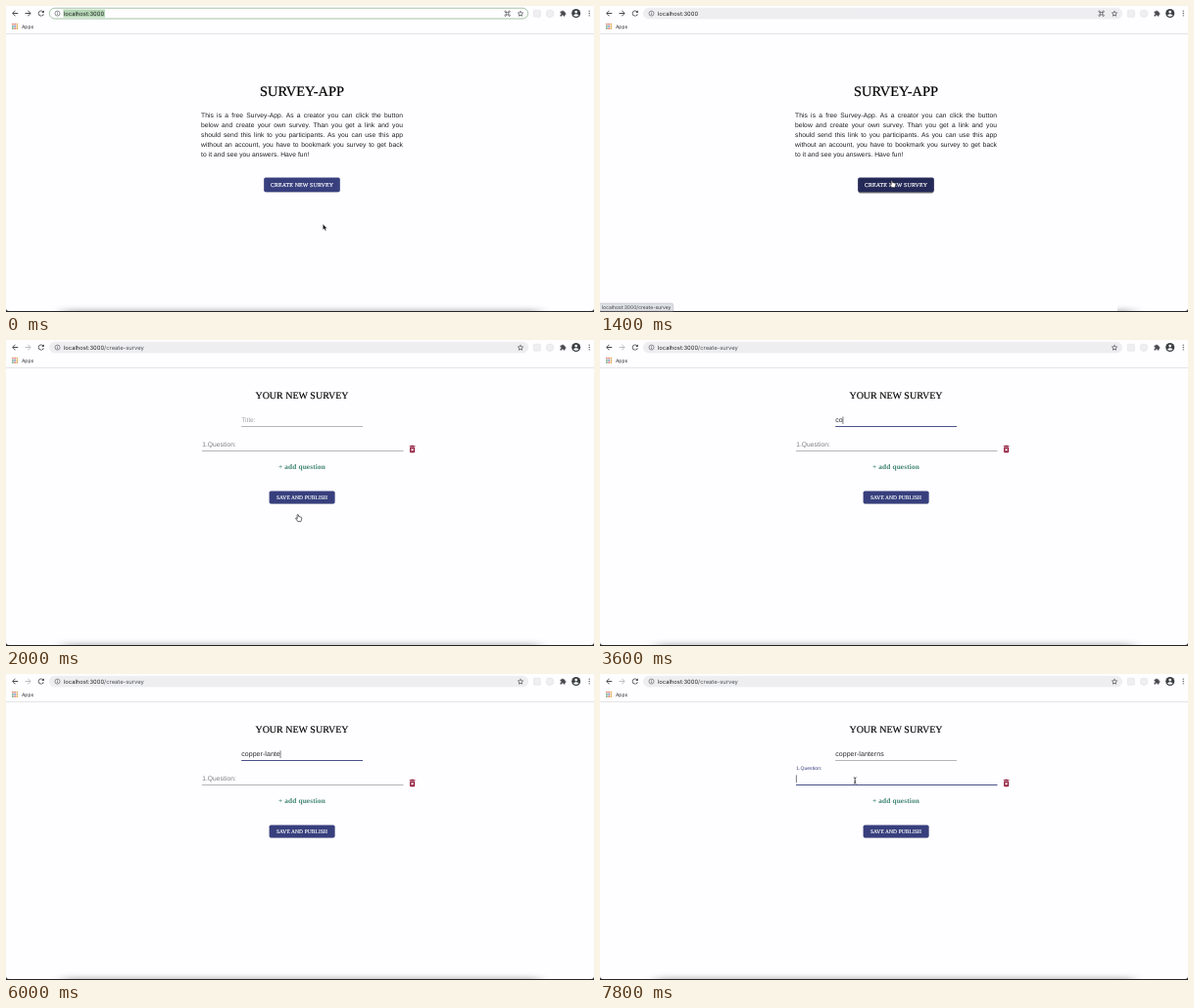
These frames come from a looping animation (600 px wide and 313 px high, 8000 ms). An HTML page:

```html
<!DOCTYPE html>
<html lang="en">
<head>
<meta charset="utf-8">
<title>Survey app</title>
<style>
  html, body { margin: 0; width: 100%; height: 100%; overflow: hidden; background: #fefdff; }
  svg { display: block; width: 100vw; height: 100vh; }
  text { text-rendering: geometricPrecision; white-space: pre; }
  .ui { font-family: Inter, "Open Sans", sans-serif; }
  .serif { font-family: "Liberation Serif", "Times New Roman", serif; }
  .sans, .intro { font-family: "Liberation Sans", Arial, sans-serif; letter-spacing: .06px; }
  .intro { font-size: 6.7px; line-height: 10px; color: #1c1c1e; text-rendering: geometricPrecision; }
  .intro div { text-align: justify; text-align-last: justify; }
  .intro div:last-child { text-align-last: left; }
  .mid { text-anchor: middle; }
</style>
</head>
<body>
<svg viewBox="0 0 600 313" xmlns="http://www.w3.org/2000/svg">
  <defs>
    <filter id="blur" x="-10%" y="-200%" width="120%" height="500%"><feGaussianBlur stdDeviation="7 2.6"/></filter>
    <filter id="soft" x="-10%" y="-30%" width="120%" height="170%"><feGaussianBlur stdDeviation=".7"/></filter>
    <clipPath id="glowClip"><rect id="glowArea" y="295" width="600" height="18"/></clipPath>
  </defs>
  <rect width="600" height="313" fill="#fefdff"/>

  <g id="toolbar">
    <rect id="pill" x="44.3" y="2.2" width="488.4" height="10.8" rx="5.4" stroke-width=".8"/>
    <rect id="selection" x="58.5" y="3.6" width="42.5" height="8" fill="#b4d6b4"/>
    <g id="icons" fill="#47494d"></g>
    <circle cx="52.5" cy="7.6" r="2.5" fill="none" stroke="#55585c" stroke-width=".65"/>
    <path d="M52.5 6.1v.7M52.5 7.3v1.8" stroke="#55585c" stroke-width=".65"/>
    <text class="ui" x="58.9" y="9.7" font-size="5.83" fill="#202124">localhost:3000<tspan id="path" fill="#4b4e52">/create-survey</tspan></text>
    <path id="command" d="M510.4 6.5h2.4v2.4h-2.4zM510.4 6.5h-.8a.8.8 0 1 1 .8-.8zM512.8 6.5v-.8a.8.8 0 1 1 .8.8zM512.8 8.9h.8a.8.8 0 1 1-.8.8zM510.4 8.9v.8a.8.8 0 1 1-.8-.8z" fill="none" stroke="#47494d" stroke-width=".6"/>
    <rect x="538.4" y="4.2" width="7" height="7" rx="1" fill="#efeef0" stroke="#dcdcde" stroke-width=".5"/>
    <circle cx="555" cy="7.7" r="3.8" fill="#efeef0" stroke="#dcdcde" stroke-width=".5"/>
    <circle cx="581.7" cy="7.5" r="4.5" fill="#3c4043"/>
    <circle cx="581.7" cy="6.1" r="1.4" fill="#fefdff"/>
    <path d="M578.9 9.6q2.8-2.8 5.6 0q-2.8 2.4-5.6 0" fill="#fefdff"/>
    <g id="dots"></g>
    <text class="ui" x="15.9" y="22.5" font-size="5" fill="#303236">Apps</text>
    <path d="M0 28.4H600" stroke="#dcdcde" stroke-width=".8"/>
  </g>

  <g id="home">
    <text class="serif mid" x="302" y="92" font-size="14.4" stroke="#000" stroke-width=".2">SURVEY-APP</text>
    <foreignObject x="199" y="108.2" width="206" height="52">
      <div xmlns="http://www.w3.org/1999/xhtml" class="intro">
        <div>This is a free Survey-App. As a creator you can click the button</div>
        <div>below and create your own survey. Than you get a link and you</div>
        <div>should send this link to you participants. As you can use this app</div>
        <div>without an account, you have to bookmark you survey to get back</div>
        <div>to it and see you answers. Have fun!</div>
      </div>
    </foreignObject>
    <rect id="createShadow" x="263.6" y="176" width="76.8" height="14.4" rx="1.7" filter="url(#soft)"/>
    <rect id="create" x="263.2" y="175.4" width="77.6" height="14.8" rx="1.7"/>
    <text class="serif mid" x="302" y="184.7" font-size="5.95" letter-spacing=".12" fill="#fff" stroke="#fff" stroke-width=".16">CREATE NEW SURVEY</text>
  </g>

  <g id="editor">
    <text class="serif mid" x="302" y="59.6" font-size="10" stroke="#000" stroke-width=".15">YOUR NEW SURVEY</text>
    <text id="title" class="sans" x="240.2" y="84.3"></text>
    <path id="titleLine" d="M240.2 88.5H364"/>
    <text id="question" class="sans" x="200.2">1.Question:</text>
    <path id="questionLine" d="M200 113.5H405.5"/>
    <path id="caret" stroke="#111" stroke-width=".55"/>
    <path fill="#8f1838" fill-rule="evenodd" transform="translate(409.6 106.5) scale(.4167)" d="M6 19c0 1.1.9 2 2 2h8c1.1 0 2-.9 2-2V7H6v12zm2.46-7.12l1.41-1.41L12 12.59l2.12-2.12 1.41 1.41L13.41 14l2.12 2.12-1.41 1.41L12 15.41l-2.12 2.12-1.41-1.41L10.59 14l-2.13-2.12zM15.5 4l-1-1h-5l-1 1H5v2h14V4z"/>
    <text class="serif mid" x="302" y="131.5" font-size="7.3" font-weight="bold" letter-spacing=".15" fill="#3d8370">+ add question</text>
    <rect x="269" y="155" width="66.2" height="12.6" rx="1.7" fill="#000" opacity=".28" filter="url(#soft)"/>
    <rect x="268.6" y="154.6" width="67" height="12.8" rx="1.7" fill="#373f7d"/>
    <text class="serif mid" x="302" y="162.8" font-size="5.5" letter-spacing=".08" fill="#fff" stroke="#fff" stroke-width=".15">SAVE AND PUBLISH</text>
  </g>

  <g clip-path="url(#glowClip)">
    <rect x="58" y="310" width="486" height="8" fill="#777" opacity=".42" filter="url(#blur)"/>
  </g>
  <path d="M0 309.5Q.2 312 3 312H597Q599.8 312 600 309.5V313H0Z" fill="#252527"/>
  <g id="status">
    <path d="M-1 304.2H73.2Q74.6 304.2 74.6 305.6V312H-1Z" fill="#dee1e6" stroke="#b9bbc0" stroke-width=".6"/>
    <text class="ui" x="1.9" y="310" font-size="5.03" fill="#3c4043">localhost:3000/create-survey</text>
  </g>

  <g id="pointer" stroke-linejoin="round">
    <path id="arrow" d="M0 0V6.2L1.4 4.9 2.4 7.1 3.5 6.6 2.6 4.5H4.4Z" fill="#111" stroke="#fff" stroke-width=".4"/>
    <path id="hand" d="M-1.5-3.2q.7-.8 1.3.1l.5 2 .7-.2.8.3.8.1q.8.3.6 1.4l-.4 2-.6 1.2H-.8L-2.8.9q-.4-1 .5-.9l.9.8Z" fill="#fff" stroke="#111" stroke-width=".65"/>
    <path id="beam" d="M-1.4-3.2Q0-3.2 0-2.2Q0-3.2 1.4-3.2M0-2.2V2.2M-1.4 3.2Q0 3.2 0 2.2Q0 3.2 1.4 3.2M-.7.9H.7" fill="none" stroke="#111" stroke-width=".7"/>
  </g>
</svg>
<script>
const LOOP = 8000, STEP = 200;
const NAME = "copper-lanterns";
const BLUE = "#373f7d";
const INK = "#47494d";
const $ = id => document.getElementById(id);
const set = (id, attrs) => { for (const key in attrs) $(id).setAttribute(key, attrs[key]); };
const show = (id, on) => set(id, { visibility: on ? "visible" : "hidden" });

// Each entry holds from its time until the next one.
const typed = [[0, 0], [3400, 1], [3600, 2], [4000, 3], [4200, 4], [4400, 5], [4600, 6],
  [5000, 7], [5200, 8], [5400, 10], [5600, 11], [6000, 12], [6200, 13], [6400, 14], [6600, 15]];
const moves = [
  [0, "arrow", 323.3, 222.9], [800, "arrow", 317, 211], [1000, "arrow", 306, 196],
  [1200, "hand", 298.6, 182], [2200, "arrow", 297, 179], [2600, "arrow", 297, 173],
  [2800, "arrow", 296, 165], [3000, "arrow", 294, 155], [3200, "beam", 290, 83],
  [3400, "", 0, 0], [7000, "arrow", 278, 125], [7200, "beam", 264, 112], [7400, "beam", 260.2, 109]
];
const at = (track, t) => track.filter(entry => entry[0] <= t).pop();

function addIcon(id, d, cx, cy, scale) {
  const icon = document.createElementNS("http://www.w3.org/2000/svg", "path");
  icon.id = id;
  icon.setAttribute("d", d);
  icon.setAttribute("transform", `translate(${cx} ${cy}) scale(${scale}) translate(-12 -12)`);
  $("icons").append(icon);
}

function addDot(parent, cx, cy, r, fill) {
  const dot = document.createElementNS("http://www.w3.org/2000/svg", "circle");
  for (const [key, value] of Object.entries({ cx, cy, r, fill })) dot.setAttribute(key, value);
  $(parent).append(dot);
}

function build() {
  addIcon("back", "M20 11H7.83l5.59-5.59L12 4l-8 8 8 8 1.41-1.41L7.83 13H20v-2z", 9.2, 7.5, .38);
  addIcon("forward", "M12 4l-1.41 1.41L16.17 11H4v2h12.17l-5.58 5.59L12 20l8-8z", 22.6, 7.5, .38);
  addIcon("reload", "M17.65 6.35C16.2 4.9 14.21 4 12 4c-4.42 0-7.99 3.58-7.99 8s3.57 8 7.99 8c3.73 0 6.84-2.55 7.73-6h-2.08c-.82 2.33-3.04 4-5.65 4-3.31 0-6-2.69-6-6s2.69-6 6-6c1.66 0 3.14.69 4.22 1.78L13 11h7V4l-2.35 2.35z", 35.8, 7.5, .38);
  addIcon("star", "M22 9.24l-7.19-.62L12 2 9.19 8.63 2 9.24l5.46 4.73L5.82 21 12 17.27 18.18 21l-1.63-7.03L22 9.24zM12 15.4l-3.76 2.27 1-4.28-3.32-2.88 4.38-.38L12 6.1l1.71 4.04 4.38.38-3.32 2.88 1 4.28L12 15.4z", 525, 7.7, .33);
  addIcon("puzzle", "M20.5 11H19V7c0-1.1-.9-2-2-2h-4V3.5C13 2.12 11.88 1 10.5 1S8 2.12 8 3.5V5H4c-1.1 0-2 .9-2 2v3.8h1.5c1.49 0 2.7 1.21 2.7 2.7s-1.21 2.7-2.7 2.7H2V20c0 1.1.9 2 2 2h3.8v-1.5c0-1.49 1.21-2.7 2.7-2.7s2.7 1.21 2.7 2.7V22H17c1.1 0 2-.9 2-2v-4h1.5c1.38 0 2.5-1.12 2.5-2.5S21.88 11 20.5 11z", 568.4, 7.6, .29);
  const colors = ["#dc6a5c", "#dc6a5c", "#e0a040", "#5c9a6a", "#5a83cc", "#e0a040", "#5c9a6a", "#dc6a5c", "#e0a040"];
  colors.forEach((fill, i) => addDot("dots", 6.9 + i % 3 * 2.2, 18.5 + Math.floor(i / 3) * 2.2, .85, fill));
  for (const y of [5.2, 7.5, 9.8]) addDot("icons", 595.2, y, .65, INK);
}

function drawLine(id, focused, hovered) {
  set(id, { stroke: focused ? BLUE : hovered ? "#222" : "#858587", "stroke-width": focused ? .9 : .6 });
}

function drawEditor(t) {
  const count = at(typed, t)[1];
  const titleFocus = t >= 3200 && t < 7400;
  const questionFocus = t >= 7400;
  const title = $("title");
  title.textContent = count ? NAME.slice(0, count) : "Title:";
  set("title", { fill: count ? "#2c2c2e" : "#a0a0a2", "font-size": count ? 7 : 6.67 });
  drawLine("titleLine", titleFocus, false);
  drawLine("questionLine", questionFocus, t >= 7200);
  set("question", {
    y: questionFocus ? 98.3 : 109.3,
    "font-size": questionFocus ? 5 : 6.67,
    fill: questionFocus ? BLUE : "#7c7c7e"
  });
  if (questionFocus) {
    set("caret", { d: "M200.4 103.4V111.2" });
  } else {
    const x = 240.4 + (count ? title.getComputedTextLength() : 0);
    set("caret", { d: `M${x} 78.4V86` });
  }
  show("caret", titleFocus || questionFocus);
}

function draw(time) {
  const t = Math.floor(time % LOOP / STEP) * STEP;
  const home = t < 2000;
  const hover = home && t >= 1200;
  const selected = t < 200;

  set("pill", { fill: selected ? "#fefdff" : "#eeeef0", stroke: selected ? "#8fb58f" : "#eeeef0" });
  show("selection", selected);
  show("command", home);
  set("forward", { fill: home ? INK : "#bcbdc0" });
  set("path", { display: home ? "none" : "inline" });
  set("home", { display: home ? "inline" : "none" });
  set("editor", { display: home ? "none" : "inline" });
  set("create", { fill: hover ? "#242957" : BLUE });
  set("createShadow", { opacity: hover ? .55 : .28, y: hover ? 177 : 176 });
  show("status", hover);
  set("glowArea", { x: hover ? 528 : 0 });
  if (!home) drawEditor(t);

  const [, kind, x, y] = at(moves, t);
  for (const id of ["arrow", "hand", "beam"]) show(id, id === kind);
  set("pointer", { transform: `translate(${x} ${y})` });
}

function tick() {
  draw(performance.now());
  requestAnimationFrame(tick);
}

build();
tick();
</script>
</body>
</html>
```
